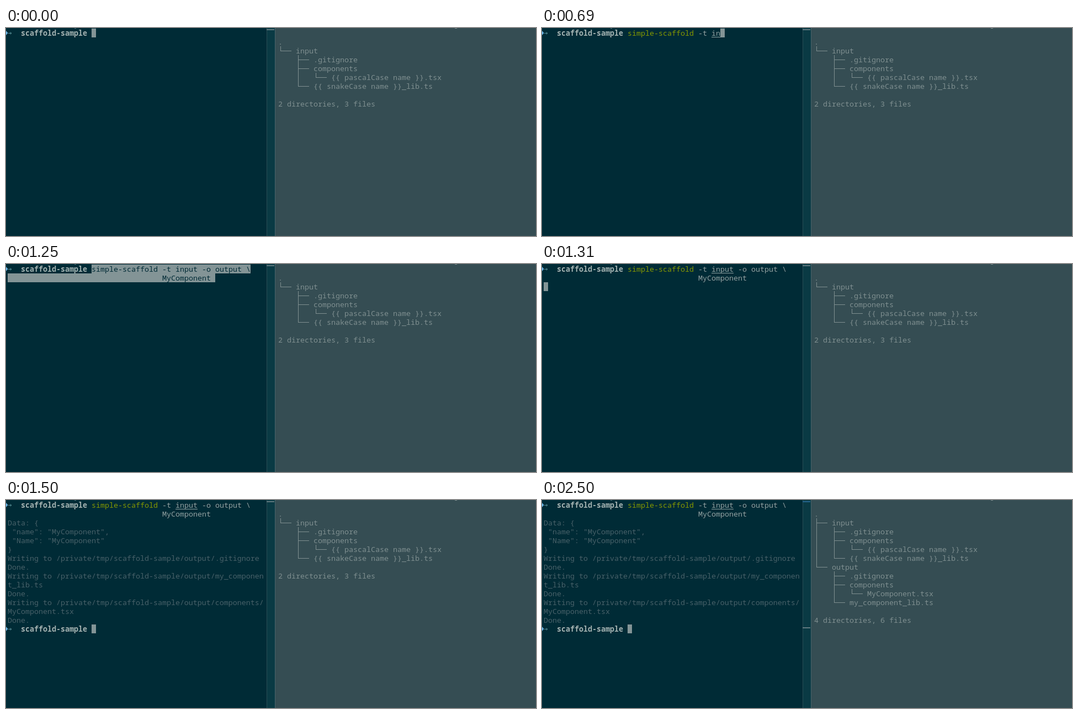
Recreate the animation shown at these times as an HTML page with a canvas. Size 960 by 376 pixels, loop 2880 ms.

```html
<!DOCTYPE html>
<html lang="en">
<head>
<meta charset="utf-8">
<title>Scaffold terminal</title>
<style>
html, body { margin: 0; height: 100%; overflow: hidden; background: #002b36; }
canvas { display: block; }
</style>
</head>
<body>
<canvas id="stage" width="960" height="376"></canvas>
<script>
const ctx = document.getElementById('stage').getContext('2d');
const LOOP = 2880, CELL = 8, ROW = 16, LEFT = 3, RIGHT = 493;
const PASTE = 750, ENTER = 1310, OUTPUT = 1500, TREE = 1630;
const BG = '#002b36', FG = '#93a1a1', DIM = '#486169', BLOCK = '#839496', TREE_FG = '#7f8f90';

const log = `Data: {
 "name": "MyComponent",
 "Name": "MyComponent"
}
Writing to /private/tmp/scaffold-sample/output/.gitignore
Done.
Writing to /private/tmp/scaffold-sample/output/my_componen
t_lib.ts
Done.
Writing to /private/tmp/scaffold-sample/output/components/
MyComponent.tsx
Done.`.split('\n');

const inputTree = ['├── .gitignore', '├── components',
  '│   └── {{ pascalCase name }}.tsx', '└── {{ snakeCase name }}_lib.ts'];
const outputTree = ['├── .gitignore', '├── components',
  '│   └── MyComponent.tsx', '└── my_component_lib.ts'];
const indent = (lines, pad) => lines.map(line => pad + line);
const before = ['.', '└── input', ...indent(inputTree, '    '), '', '2 directories, 3 files'];
const after = ['.', '├── input', ...indent(inputTree, '│   '),
  '└── output', ...indent(outputTree, '    '), '', '4 directories, 6 files'];

function rect(x, y, w, h, color) {
  ctx.fillStyle = color;
  ctx.fillRect(x, y, w, h);
}

function text(str, col, row, color, weight = 500, origin = LEFT) {
  ctx.font = `${weight} 13.333px "Noto Sans Mono", "DejaVu Sans Mono", monospace`;
  ctx.fillStyle = color;
  ctx.fillText(str, origin + col * CELL, row * ROW + 14);
}

function block(col, row, cols = 1) {
  rect(LEFT + col * CELL, row * ROW + 1, cols * CELL, ROW, BLOCK);
}

function prompt(row) {
  const y = row * ROW + 9;
  ctx.fillStyle = '#6bb5e6';
  ctx.beginPath();
  ctx.moveTo(0, y - 4);
  ctx.lineTo(3.5, y);
  ctx.lineTo(0, y + 4);
  ctx.fill();
  ctx.strokeStyle = '#568d96';
  ctx.lineWidth = 1;
  ctx.beginPath();
  ctx.moveTo(4, y + .5);
  ctx.lineTo(10, y + .5);
  ctx.moveTo(7.5, y - 1.5);
  ctx.lineTo(10, y + .5);
  ctx.lineTo(7.5, y + 2.5);
  ctx.stroke();
  text('scaffold-sample', 3, row, '#a5b3b2', 700);
}

// Box-drawing characters become thin lines; the rest is set as text.
function treeLine(line, row) {
  const top = row * ROW + 1, mid = top + 8;
  [...line].forEach((ch, col) => {
    const x = RIGHT + col * CELL;
    if ('│├└'.includes(ch)) rect(x + 4, top, 1, ch === '└' ? 9 : ROW, TREE_FG);
    if ('├└'.includes(ch)) rect(x + 4, mid, 4, 1, TREE_FG);
    if (ch === '─') rect(x, mid, CELL, 1, TREE_FG);
  });
  const start = line.search(/[^│├└─ ]/);
  if (start >= 0) text(line.slice(start), start, row, TREE_FG, 500, RIGHT);
}

function command(t) {
  if (t < 690) return block(19, 0);
  if (t >= PASTE && t < ENTER) {
    block(19, 0, 36);
    block(0, 1, 47);
    text('simple-scaffold -t input -o output \\', 19, 0, BG);
    text('MyComponent', 35, 1, BG);
    return;
  }
  const typing = t < PASTE, path = typing ? 'in' : 'input';
  text('simple-scaffold', 19, 0, '#859900');
  text('-t ' + path, 35, 0, FG);
  rect(LEFT + 38 * CELL, 16, path.length * CELL, 1, FG);
  if (typing) return block(40, 0);
  text('-o output \\', 44, 0, FG);
  text('MyComponent', 35, 1, FG);
  if (t < OUTPUT) return block(0, 2);
  log.forEach((line, i) => text(line, 0, i + 2, DIM));
  prompt(14);
  block(19, 14);
}

function draw(t) {
  const done = t >= TREE;
  rect(0, 0, 960, 376, BG);
  rect(472, 0, 16, 376, '#0a3a44');
  rect(472, 0, 1, 376, '#294d55');
  rect(487, 0, 473, 376, '#354d53');
  rect(487, 0, 1, 376, '#48636a');
  rect(472, 2, 14, 2, done ? '#25658f' : '#617a80');
  if (done) rect(472, 230, 14, 2, '#617a80');
  rect(813, 0, 4, 1, '#7f8f90');
  rect(124, 0, 3, 1, '#53717a');
  prompt(0);
  command(t);
  (done ? after : before).forEach((line, i) => treeLine(line, i + 1));
}

const begin = performance.now();
function tick() {
  draw((performance.now() - begin) % LOOP);
  requestAnimationFrame(tick);
}
tick();
</script>
</body>
</html>
```
